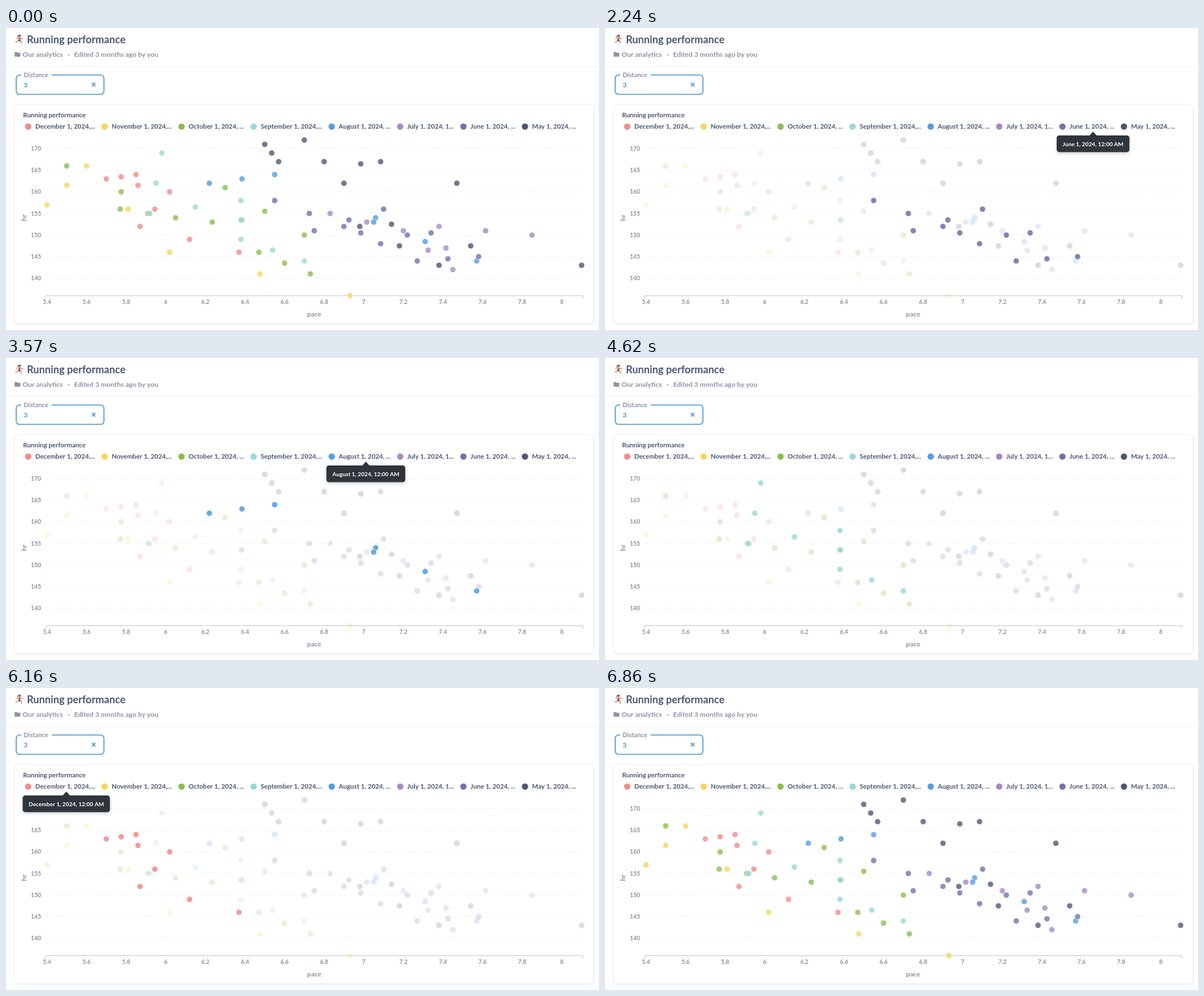
An HTML page with a canvas for the animation above (7560 ms loop, 1049 by 534 pixels).

```html
<!DOCTYPE html>
<html lang="en">
<head>
<meta charset="utf-8">
<title>Running performance</title>
<style>
  html, body { margin: 0; width: 100%; height: 100%; overflow: hidden; background: #fff; }
  canvas { display: block; width: 1049px; height: 534px; }
</style>
</head>
<body>
<canvas id="stage"></canvas>
<script>
const W = 1049, H = 534, LOOP = 7560, STEP = 70, FADE = 300, TIP_DELAY = 30;
const NORMAL = 0.8, ACTIVE = 0.88, DIM = 0.2;
const DARK = '#4c5773', GREY = '#8d93a3', BLUE = '#4f97cd';
const BIG = 18.2, MEDIUM = 12.1, LEGEND = 11.55, SMALL = 10.4, TIP = 10.15;

// Each series follows a path of a few runs (pace, heart rate);
// one more run lies halfway along every leg.
const series = [
  { month: 'December', tail: '...', color: '#ef8c8c',
    path: [[5.85, 164], [5.7, 163], [6.02, 160], [5.87, 152], [6.37, 146]] },
  { month: 'November', tail: '...', color: '#f9d45c',
    path: [[5.4, 157], [5.6, 166], [6.02, 146], [6.93, 136]] },
  { month: 'October', tail: ' ...', color: '#88bf4d',
    path: [[5.5, 166], [6.05, 154], [5.77, 156], [6.7, 150], [6.3, 161], [6.47, 146], [6.73, 141]] },
  { month: 'September', tail: '...', color: '#98d9d9',
    path: [[5.98, 169], [5.92, 155], [6.38, 158], [6.38, 149], [6.7, 144]] },
  { month: 'August', tail: ' ...', color: '#529ddf',
    path: [[6.22, 162], [6.55, 164], [7.57, 144], [7.05, 153]] },
  { month: 'July', tail: ' 1...', color: '#a989c5',
    path: [[6.83, 155], [7.2, 151], [7.45, 142], [7.38, 152], [7.85, 150]] },
  { month: 'June', tail: ' ...', color: '#7172ad',
    path: [[6.55, 158], [6.9, 152], [7.27, 144], [7.58, 145], [7.1, 156], [6.75, 151], [7.22, 150]] },
  { month: 'May', tail: ' ...', color: '#4c5773',
    path: [[6.57, 167], [6.5, 171], [7.47, 162], [6.7, 172], [6.9, 162], [7.38, 143], [6.98, 152], [8.1, 143]] }
];

// The pointer walks the legend from the last entry to the first, then leaves.
const hovers = [1365, 1950, 2720, 3350, 3910, 4610, 5240, 5940, 6640]
  .map((time, i) => ({ time, index: series.length - 1 - i }));

const canvas = document.getElementById('stage');
const ctx = canvas.getContext('2d');
const ratio = window.devicePixelRatio || 1;
canvas.width = W * ratio;
canvas.height = H * ratio;
ctx.scale(ratio, ratio);

const px = pace => 72.4 + (pace - 5.4) * 350.3;
const py = hr => 213.4 + (170 - hr) * 7.635;
const easeOut = p => 1 - Math.pow(1 - Math.min(p, 1), 3);
const middle = (a, b) => [(a[0] + b[0]) / 2, (a[1] + b[1]) / 2];
const withMiddles = path => path.flatMap((p, i) => i ? [middle(path[i - 1], p), p] : [p]);
const setFont = size => { ctx.font = `bold ${size}px Lato, sans-serif`; };

// Legend entries follow each other by the width of their labels.
function layOutLegend() {
  let x = 39.3;
  setFont(LEGEND);
  for (const s of series) {
    s.points = withMiddles(s.path);
    s.label = `${s.month} 1, 2024,${s.tail}`;
    s.x = x;
    const width = ctx.measureText(s.label).width;
    s.tip = x + 14.4 + width / 2;
    x += width + 29.3;
  }
}

function text(str, x, y, size, color, align = 'left') {
  setFont(size);
  ctx.textAlign = align;
  ctx.fillStyle = color;
  ctx.fillText(str, x, y);
}

function line(points, color, width) {
  ctx.beginPath();
  points.forEach(([x, y]) => ctx.lineTo(x, y));
  ctx.strokeStyle = color;
  ctx.lineWidth = width;
  ctx.stroke();
}

function disc(x, y, r, color) {
  ctx.beginPath();
  ctx.arc(x, y, r, 0, Math.PI * 2);
  ctx.fillStyle = color;
  ctx.fill();
}

function box(x, y, w, h, r) {
  ctx.beginPath();
  ctx.roundRect(x, y, w, h, r);
}

function shadow(color, blur, dy) {
  ctx.shadowColor = color;
  ctx.shadowBlur = blur * ratio;
  ctx.shadowOffsetY = dy * ratio;
}

function drawRunner() {
  ctx.save();
  ctx.lineCap = ctx.lineJoin = 'round';
  line([[23, 22], [20, 24.5], [17, 24.5]], '#c08d6b', 1.6);
  line([[24, 22], [27, 24], [27, 27]], '#c08d6b', 1.6);
  line([[19, 19], [20, 17.3], [25, 17.5], [27.3, 19.5], [30, 18.4]], '#c48f6b', 1.4);
  line([[24.4, 17.8], [23.4, 20.5]], '#e2604f', 3);
  line([[23, 21.7], [24, 22.2]], '#35465d', 2.6);
  disc(24.6, 14.3, 2.1, '#c48f6b');
  line([[20.5, 14.7], [23, 13.5], [25.2, 12.5]], '#403630', 1.4);
  ctx.restore();
}

function drawHeader() {
  drawRunner();
  text('Running performance', 37, 26.6, BIG, DARK);
  ctx.fillStyle = GREY;
  box(15.3, 42.5, 4.8, 4, 1);
  ctx.fill();
  box(15.3, 43.8, 10, 7, 1);
  ctx.fill();
  text('Our analytics', 29.2, 51.4, MEDIUM, GREY);
  disc(110.9, 47.6, 1.7, '#b4b9c4');
  text('Edited 3 months ago by you', 120.5, 51.4, MEDIUM, GREY);
  line([[0, 68], [W, 68]], '#eeeff1', 1);
}

function drawFilter() {
  box(18.2, 83.2, 155, 34, 5.5);
  ctx.strokeStyle = '#dcecf8';
  ctx.lineWidth = 3.2;
  ctx.stroke();
  ctx.fillStyle = '#fff';
  ctx.fill();
  ctx.strokeStyle = BLUE;
  ctx.lineWidth = 1.6;
  ctx.stroke();
  ctx.fillStyle = '#fff';
  ctx.fillRect(27, 79, 54, 8);
  text('Distance', 31.2, 86.8, 11.2, GREY);
  text('3', 31.2, 104.6, MEDIUM, BLUE);
  for (const side of [-1, 1]) {
    line([[155 - 3.2 * side, 96.9], [155 + 3.2 * side, 103.3]], BLUE, 1.7);
  }
}

function drawCard() {
  ctx.save();
  shadow('rgba(60,70,90,0.13)', 4, 1);
  box(15, 135.5, 1025, 387, 7);
  ctx.fillStyle = '#fff';
  ctx.fill();
  ctx.restore();
  ctx.strokeStyle = '#eff0f2';
  ctx.lineWidth = 1;
  ctx.stroke();
  text('Running performance', 30.2, 157.7, LEGEND, DARK);
  for (const s of series) {
    disc(s.x, 174.3, 5.6, s.color);
    text(s.label, s.x + 12.4, 178.2, LEGEND, DARK);
  }
}

function drawAxes() {
  for (let hr = 140; hr <= 170; hr += 5) {
    ctx.setLineDash([4.4, 4.4]);
    line([[70, py(hr)], [1020, py(hr)]], '#eeeff1', 1);
    ctx.setLineDash([]);
    text(hr, 62, py(hr) + 3.6, SMALL, GREY, 'right');
  }
  line([[70.2, 478.5], [70.2, 473.4], [1020.5, 473.4], [1020.5, 478.5]], '#bdc1c9', 1);
  for (let i = 0; i < 14; i++) {
    const pace = +(5.4 + i * 0.2).toFixed(1);
    text(pace, px(pace), 488.3, SMALL, GREY, 'center');
  }
  text('pace', 545.2, 509.5, MEDIUM, GREY, 'center');
  ctx.save();
  ctx.translate(35.5, 335.5);
  ctx.rotate(-Math.PI / 2);
  text('hr', 0, 0, MEDIUM, GREY, 'center');
  ctx.restore();
}

function opacityAt(series, t) {
  let from = NORMAL, to = NORMAL, start = -FADE;
  const value = time => from + (to - from) * easeOut((time - start) / FADE);
  for (const { time, index } of hovers) {
    if (time > t) break;
    from = value(time);
    to = index < 0 ? NORMAL : index === series ? ACTIVE : DIM;
    start = time;
  }
  return value(t);
}

function drawSeries(index, t) {
  const { points, color } = series[index];
  ctx.save();
  ctx.globalAlpha = opacityAt(index, t);
  ctx.strokeStyle = '#fff';
  ctx.lineWidth = 0.9;
  for (const [pace, hr] of points) {
    disc(px(pace), py(hr), 5.2, color);
    ctx.stroke();
  }
  ctx.restore();
}

function drawTooltip({ month, tip }) {
  const label = `${month} 1, 2024, 12:00 AM`;
  setFont(TIP);
  const width = ctx.measureText(label).width + 21;
  ctx.save();
  shadow('rgba(0,0,0,0.2)', 6, 2);
  ctx.fillStyle = '#2e353b';
  box(tip - width / 2, 190, width, 29.6, 4.5);
  ctx.moveTo(tip - 6.5, 190.2);
  ctx.lineTo(tip, 183.3);
  ctx.lineTo(tip + 6.5, 190.2);
  ctx.fill();
  ctx.restore();
  text(label, tip, 208.5, TIP, '#fff', 'center');
}

function draw(t) {
  ctx.fillStyle = '#fff';
  ctx.fillRect(0, 0, W, H);
  drawHeader();
  drawFilter();
  drawCard();
  drawAxes();
  const { time, index } = hovers.filter(h => h.time <= t).pop() || { index: -1 };
  series.forEach((s, i) => { if (i !== index) drawSeries(i, t); });
  if (index < 0) return;
  drawSeries(index, t);
  if (t - time > TIP_DELAY) drawTooltip(series[index]);
}

layOutLegend();
const origin = performance.now();
function tick() {
  const t = (performance.now() - origin) % LOOP;
  draw(Math.floor(t / STEP) * STEP);
  requestAnimationFrame(tick);
}
tick();
</script>
</body>
</html>
```
